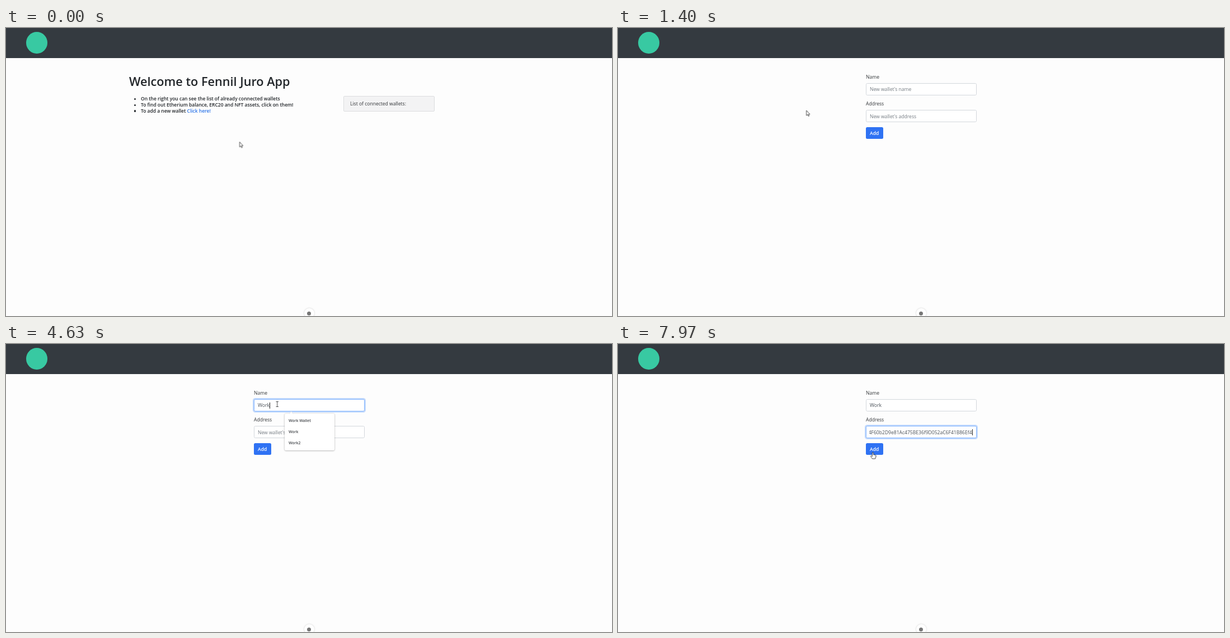
Write an HTML page that moves like this. It is 1083 by 517 pixels and loops after 8 s.

```html
<!DOCTYPE html>
<html lang="en">
<head>
<meta charset="utf-8">
<title>Add a wallet</title>
<style>
html, body { margin: 0; width: 100%; height: 100%; overflow: hidden; background: #fdfdfd; }
body { position: relative; font: 8.55px "Open Sans", "Noto Sans", sans-serif; color: #333639; }
body *, .menu::before { box-sizing: border-box; }
div, svg { position: absolute; }

/* one shared 8 s clock; every percentage is ms / 80 */
.anim { animation: 8s step-end infinite; }
.smooth { animation-timing-function: linear; }

/* text is placed by its left edge and vertical centre */
.t { left: var(--x); top: calc(var(--y) - 10px); line-height: 20px; white-space: pre; }
.semi { font-weight: 600; }
h1 { margin: 0; font: inherit; }

header { position: absolute; inset: 0 0 auto; height: 53.5px; background: #343a40; }
.logo { left: 35.5px; top: 7px; width: 38.5px; height: 39px; border-radius: 50%; background: #38c9a2; }
.badge { left: 532.5px; top: 503px; width: 18px; height: 18px; border-radius: 50%; background: #fff; box-shadow: 0 0 3px #0003; }
.badge div { left: 5.5px; top: 5.5px; width: 7px; height: 7px; border-radius: 50%; background: #777; }

.title { font-size: 21.7px; color: #212529; }
.rule { color: #212529; font-size: 8.48px; }
.rule::before { content: ""; position: absolute; left: -12.5px; top: 8.7px; width: 3.2px; height: 3.2px; border-radius: 50%; background: #212529; }
.link { color: #2b74e8; text-underline-offset: 1px; animation-name: hover; }
.list { left: 603px; top: 121.5px; width: 163px; height: 28.5px; background: #f3f3f4; border: 1px solid #dcdddf; border-radius: 2px; }
.status { left: 0; top: 506px; width: 84px; height: 11px; background: #dfe1e5; border-radius: 0 2px 0 0; font-size: 6.45px; color: #6a6d72; line-height: 10px; padding-left: 2px; white-space: pre; animation-name: status; }

.input, .ring { left: 443px; width: 197.5px; height: 22px; border-radius: 2.5px; }
.input { background: #fff; border: 1px solid #d3d7dc; }
.ring { border: 1px solid #86b7fe; box-shadow: 0 0 0 2px #0d6efd40; }
.first { top: 98.5px; }
.second { top: 147px; }
.hint { color: #747b82; }
.typed { color: #495057; }
.caret { display: inline-block; width: .8px; height: 11px; margin-left: .2px; background: #222; vertical-align: -2.6px; }
.button { left: 443px; top: 178px; width: 31px; height: 21px; border-radius: 2.5px; background: #2f72f3; }
.pasted { left: 449px; top: 148.5px; width: 184.5px; line-height: 20px; height: 20px; overflow: hidden; white-space: nowrap; display: flex; justify-content: flex-end; align-items: center; animation-name: pasted; }
.pasted .caret { flex: none; }

.menu { left: 498px; top: 125px; padding: 2.5px 7px; background: #fff; border-radius: 2px; box-shadow: 0 .5px 2.5px #0006; font-size: 6.85px; font-weight: 600; line-height: 20.3px; white-space: pre; color: #46494d; }
.menu::before { content: ""; position: absolute; left: 9px; top: -2.6px; width: 5.5px; height: 5.5px; background: #fff; border: solid #dde3ea; border-width: .8px 0 0 .8px; transform: rotate(45deg); }
.long { width: 90px; height: 127px; animation-name: long; }
.short { width: 89px; height: 66px; animation-name: short; }

.cursor { left: 0; top: 0; overflow: visible; animation-name: travel; animation-timing-function: ease-in-out; }
.cursor path { stroke-width: .8; stroke: #222; fill: #fff; stroke-linejoin: round; }

@keyframes home { 0% { opacity: 1 } 15.375%, to { opacity: 0 } }
@keyframes form { 0% { opacity: 0 } 15.375%, to { opacity: 1 } }
@keyframes hover { 0% { color: #2b74e8; text-decoration: none } 7.9%, to { color: #1f58b4; text-decoration: underline } }
@keyframes status { 0%, 12% { opacity: 0 } 12.1% { opacity: .45 } 13.3%, 15.5% { opacity: 1 } 17.5%, to { opacity: 0 } }

@keyframes ring1 { 0%, 32% { opacity: 0 } 33.6%, 67% { opacity: 1 } 68.7%, to { opacity: 0 } }
@keyframes ring2 { 0%, 67% { opacity: 0 } 68.6%, to { opacity: 1 } }
@keyframes hint1 { 0% { opacity: 1 } 45.375%, to { opacity: 0 } }
@keyframes hint2 { 0% { opacity: 1 } 80.375%, to { opacity: 0 } }
@keyframes caret1 { 0% { opacity: 0 } 32.125% { opacity: 1 } 38.7% { opacity: 0 } 45.375% { opacity: 1 } 64.6%, to { opacity: 0 } }
@keyframes caret2 { 0% { opacity: 0 } 67.125% { opacity: 1 } 74.1%, to { opacity: 0 } }
@keyframes caret3 { 0% { opacity: 1 } 87.4% { opacity: 0 } 93.9%, to { opacity: 1 } }
@keyframes pasted { 0% { opacity: 0 } 80.375%, to { opacity: 1 } }

@keyframes key1 { 0% { font-size: 0 } 45.375%, to { font-size: 8.6px } }
@keyframes key2 { 0% { font-size: 0 } 49.6%, to { font-size: 8.6px } }
@keyframes key3 { 0% { font-size: 0 } 52.5%, to { font-size: 8.6px } }
@keyframes key4 { 0% { font-size: 0 } 57.8%, to { font-size: 8.6px } }

@keyframes long { 0%, 32.1% { opacity: 0 } 33.6%, 45.4% { opacity: 1 } 46.2%, to { opacity: 0 } }
@keyframes short {
  0%, 45.35% { opacity: 0 }
  45.4%, 67.1% { opacity: 1; transform: none }
  69.6%, to { opacity: 0; transform: scale(.965) }
}

@keyframes travel {
  0%, .375% { transform: translate(417.5px, 204.5px) }
  10%, 20.4% { transform: translate(336.7px, 148px) }
  26.2%, 92.9% { transform: translate(484.7px, 108px) }
  97.5% { transform: translate(460px, 205px) }
  99.6%, to { transform: translate(455.5px, 194px) }
}
@keyframes arrow { 0% { opacity: 1 } 7.9% { opacity: 0 } 15.375% { opacity: 1 } 24.1% { opacity: 0 } 94% { opacity: 1 } 94.9% { opacity: 0 } 95.6% { opacity: 1 } 95.8% { opacity: 0 } 96.7% { opacity: 1 } 98.6%, to { opacity: 0 } }
@keyframes hand { 0% { opacity: 0 } 7.9% { opacity: 1 } 15.375% { opacity: 0 } 95.8% { opacity: 1 } 96.7% { opacity: 0 } 98.6%, to { opacity: 1 } }
@keyframes beam { 0% { opacity: 0 } 24.1% { opacity: 1 } 94% { opacity: 0 } 94.9% { opacity: 1 } 95.6%, to { opacity: 0 } }
</style>
</head>
<body>
<header><div class="logo"></div></header>

<div class="anim" style="animation-name:home">
  <div class="t title semi" style="--x:220px;--y:95.5px"><h1>Welcome to Fennil Juro App</h1></div>
  <div class="t rule semi" style="--x:241px;--y:127.3px">On the right you can see the list of already connected wallets</div>
  <div class="t rule semi" style="--x:241px;--y:138px">To find out Etherium balance, ERC20 and NFT assets, click on them!</div>
  <div class="t rule semi" style="--x:241px;--y:148.7px">To add a new wallet <span class="link anim">Click here!</span></div>
  <div class="list"></div>
  <div class="t" style="--x:615px;--y:135.6px">List of connected wallets:</div>
</div>

<div class="anim" style="animation-name:form">
  <div class="t" style="--x:443px;--y:87.8px">Name</div>
  <div class="input first"></div>
  <div class="ring first anim smooth" style="animation-name:ring1"></div>
  <div class="t hint anim" style="--x:450px;--y:110px;animation-name:hint1">New wallet's name</div>
  <div class="t typed" style="--x:450px;--y:110px"><span class="anim" style="animation-name:key1">W</span><span class="anim" style="animation-name:key2">o</span><span class="anim" style="animation-name:key3">r</span><span class="anim" style="animation-name:key4">k</span><span class="caret anim" style="animation-name:caret1"></span></div>

  <div class="t" style="--x:443px;--y:136.3px">Address</div>
  <div class="input second"></div>
  <div class="ring second anim smooth" style="animation-name:ring2"></div>
  <div class="t hint anim" style="--x:450px;--y:158.5px;animation-name:hint2">New wallet's address</div>
  <div class="t" style="--x:450px;--y:158.5px"><span class="caret anim" style="animation-name:caret2"></span></div>
  <div class="pasted typed anim"><span>4F60b2D9e81Ac475BE36f9D052aC6F41B86Ef4</span><span class="caret anim" style="animation-name:caret3"></span></div>

  <div class="button"></div>
  <div class="t semi" style="--x:450px;--y:188.6px;color:#fff">Add</div>

  <div class="menu long anim smooth">f
should be success
Personal
fff
Work Wallet
Other work</div>
  <div class="menu short anim smooth">Work Wallet
Work
Work2</div>
</div>

<div class="status anim smooth">localhost:5173/add_wallet</div>
<div class="badge"><div></div></div>

<svg class="cursor anim" width="1" height="1">
  <path class="anim" style="animation-name:arrow" d="M0 0V9.2L2.1 7.3 3.5 10.4 4.9 9.8 3.6 6.8H6.2Z"/>
  <path class="anim" style="animation-name:hand" d="M-1 .9Q0-.5 1 .9V4.5L4.4 5.3Q5.4 5.8 5.2 7.3L4.3 12H-1L-3.8 7.9Q-4 6.3-2.5 6.7L-1 8Z"/>
  <path class="anim" style="animation-name:beam;fill:none" d="M-2.2-4.5H2.2M0-4.5V4.5M-2.2 4.5H2.2"/>
</svg>
</body>
</html>
```
